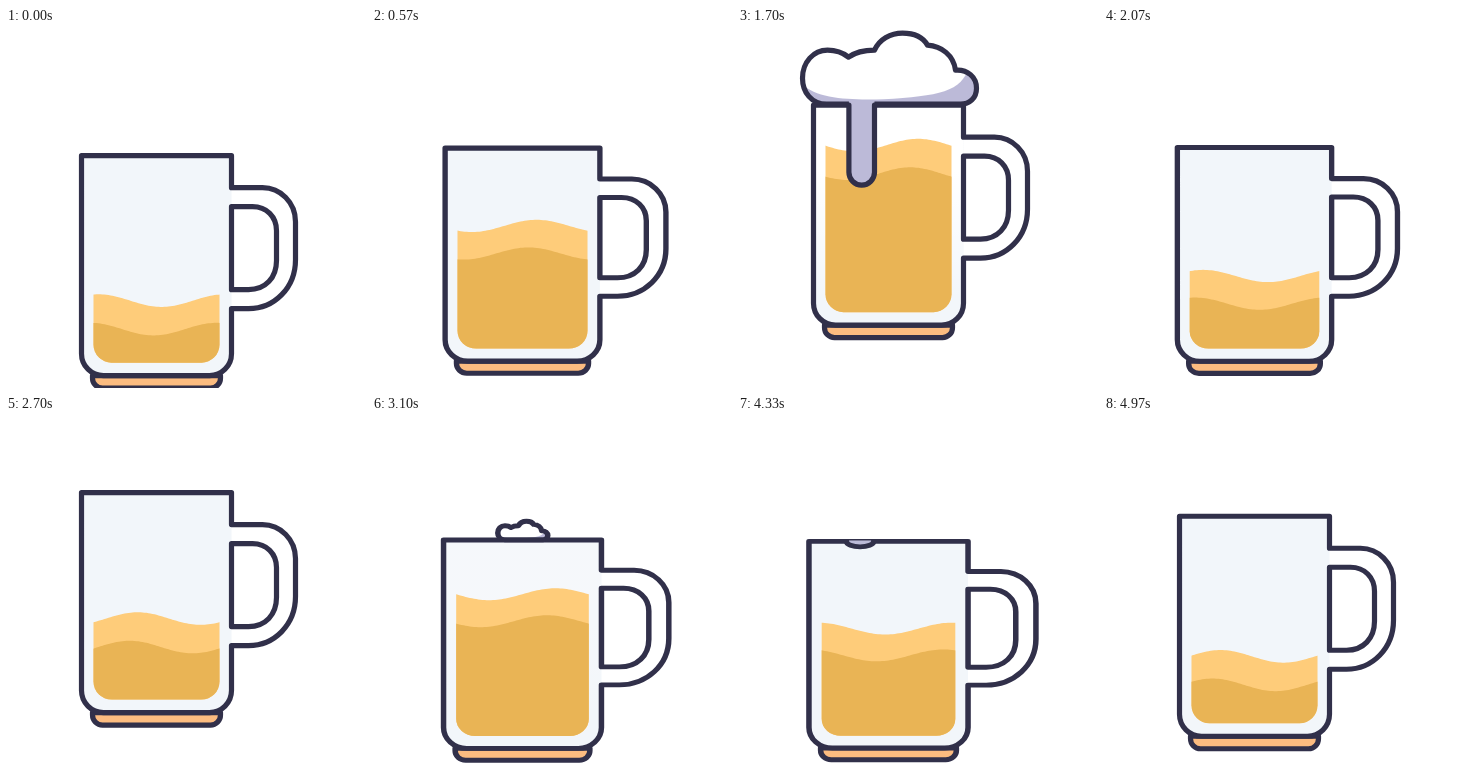
An HTML page with a canvas that plays this animation: 360 px wide and 360 px high, repeating every 5 s.

```html
<!DOCTYPE html>
<html lang="en">
<head>
<meta charset="utf-8">
<title>Beer mug</title>
<style>
  html, body { margin: 0; width: 100%; height: 100%; overflow: hidden; background: #fff; }
  canvas { display: block; width: 360px; height: 360px; }
</style>
</head>
<body>
<canvas id="stage"></canvas>
<script>
const LOOP = 5000, CYCLE = 2390;
const INK = '#31304a', GLASS = '#f2f6fa', LILAC = '#bcbad8';
const BEER_LIGHT = '#fecc7a', BEER_DARK = '#e9b455', BASE = '#fcbc80';
const RIM = 114, MID = 150, FLOOR = 347, LINE = 5.2, WAVE = 126;

const clamp = x => Math.min(1, Math.max(0, x));
const smooth = x => x * x * (3 - 2 * x);
const ramp = (u, a, b) => clamp((u - a) / (b - a));
const ease = (u, a, b) => smooth(ramp(u, a, b));

// Crouch, leap to the top, fall back to rest
function jump(u, start, dip, top, land) {
  return 14 * ease(u, start, dip) - 53 * ease(u, dip, top) + 39 * ease(u, top, land);
}

// The mug fills after the first jump and empties after the second
function pose(u) {
  const early = u > CYCLE - 200 ? u - CYCLE : u;
  const squash = .062 * (ease(u, 510, 630) - ease(u, 630, 960)
    + ease(u, 1850, 1950) - ease(u, 1950, 2180));
  return {
    squash,
    lift: jump(early, -190, 30, 340, 520) + jump(u, 1360, 1470, 1730, 1860) - 50 * squash,
    level: 145 - 105 * (ease(u, 80, 930) - ease(u, 1708, 2172)),
    trough: 155 + .1256 * u + 78 * ease(u, 2070, CYCLE),
    foam: ramp(u, 640, 900) - ramp(u, 1800, 1938),
    drip: ramp(u, 760, 1050) - ramp(u, 1800, 1952)
  };
}

const bodyFill = new Path2D('M75 114 H225 V312 A22 22 0 0 1 203 334 H97 A22 22 0 0 1 75 312 Z');
const outline = new Path2D('M225 146 V114 H75 V312 A22 22 0 0 0 97 334 H203 A22 22 0 0 0 225 312 ' +
  'V267 H242 C268 267 289 246 289 218 V180 C289 161 274 146 256 146 Z');
const handleHole = new Path2D('M225 165 H246 C260 165 270 175 270 189 V219 C270 236 259 248 242 248 H225 Z');
const basePath = new Path2D('M86 334 V336.5 A10 10 0 0 0 96 346.5 H204 A10 10 0 0 0 214 336.5 V334 Z');
const tank = new Path2D('M87 100 H213 V303 A18 18 0 0 1 195 321 H105 A18 18 0 0 1 87 303 Z');
const foamPath = new Path2D('M88 113 C73 113 64 101 64 87 C64 71 75 59 89 59 C98 59 105 62 110 66 ' +
  'C117 61 125 59 136 59 C141 48 152 42 164 42 C177 42 185 47 189 54 C203 55 215 64 217 79 ' +
  'C229 78 238 86 238 97 C238 107 231 113 222 113 Z');
const foamLit = new Path2D('M60 30 V88 C72 108 110 109 145 108 C200 105 224 100 230 76 V30 Z');

const canvas = document.getElementById('stage');
const ctx = canvas.getContext('2d');
const ratio = window.devicePixelRatio || 1;
canvas.width = canvas.height = Math.round(360 * ratio);

function fill(path, color) {
  ctx.fillStyle = color;
  ctx.fill(path);
}

function drawWave(y, low, color) {
  const wave = new Path2D();
  wave.moveTo(86, 330);
  for (let x = 86; x <= 214; x += 2) {
    wave.lineTo(x, y + 6.3 * Math.cos(2 * Math.PI * (x - low) / WAVE));
  }
  wave.lineTo(214, 330);
  fill(wave, color);
}

function drawBeer(y, low) {
  ctx.save();
  ctx.clip(tank);
  drawWave(y, low, BEER_LIGHT);
  drawWave(y + 28.5, low - 8, BEER_DARK);
  ctx.restore();
}

function drawGlass(full) {
  fill(bodyFill, GLASS);
  const shine = ctx.createLinearGradient(0, 180, 0, 310);
  shine.addColorStop(0, '#fff');
  shine.addColorStop(1, 'rgba(255,255,255,0)');
  ctx.globalAlpha = full;
  fill(bodyFill, shine);
  ctx.globalAlpha = 1;
}

function drawFoam(size) {
  if (size < .03) return;
  ctx.save();
  ctx.translate(MID, RIM);
  ctx.scale(size, size);
  ctx.translate(-MID, -RIM);
  fill(foamPath, LILAC);
  ctx.save();
  ctx.clip(foamPath);
  fill(foamLit, '#fff');
  ctx.restore();
  ctx.lineWidth = LINE / size;
  ctx.stroke(foamPath);
  ctx.restore();
}

function drawDrip(length, size) {
  if (length < .01) return;
  const end = RIM + 80 * length, r = Math.min(12.8, 80 * length);
  const tube = new Path2D();
  tube.moveTo(110.4, RIM);
  tube.lineTo(110.4, end - r);
  tube.ellipse(123.2, end - r, 12.8, r, 0, Math.PI, 0, true);
  tube.lineTo(136, RIM);
  fill(tube, LILAC);
  ctx.fillRect(110.4, 113 - 4 * size, 25.6, 4 + 4 * size);
  ctx.stroke(tube);
}

function draw(u) {
  const p = pose(u);
  ctx.setTransform(ratio, 0, 0, ratio, 0, 0);
  ctx.fillStyle = '#fff';
  ctx.fillRect(0, 0, 360, 360);
  ctx.translate(MID + .5, FLOOR + .3 + p.lift);
  ctx.scale(1 + p.squash, 1 - p.squash);
  ctx.translate(-MID, -FLOOR);
  ctx.strokeStyle = INK;
  ctx.lineWidth = LINE;
  ctx.lineJoin = ctx.lineCap = 'round';

  fill(basePath, BASE);
  ctx.stroke(basePath);
  drawGlass(p.foam);
  drawBeer(RIM + p.level, p.trough);
  ctx.stroke(outline);
  ctx.stroke(handleHole);
  drawFoam(p.foam);
  drawDrip(p.drip, p.foam);
}

const start = performance.now();
function tick() {
  draw((performance.now() - start) % LOOP % CYCLE);
  requestAnimationFrame(tick);
}
tick();
</script>
</body>
</html>
```
